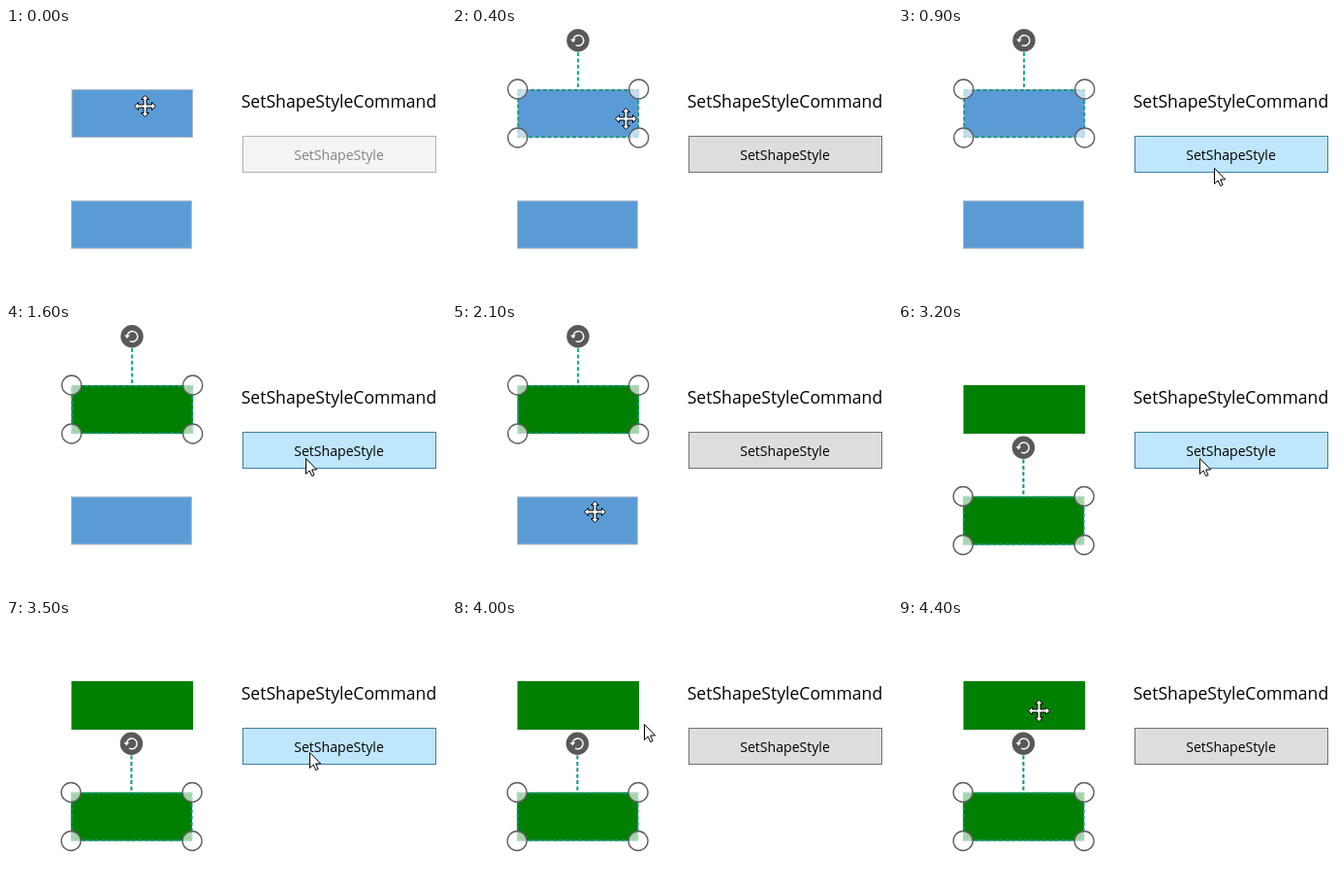
An HTML page that plays this animation: 454 px wide and 276 px high, repeating every 4.5 s.

```html
<!DOCTYPE html>
<html lang="en">
<head>
<meta charset="utf-8">
<style>
  html, body { margin: 0; width: 100%; height: 100%; overflow: hidden; background: #fff; }
  svg { display: block; width: 454px; height: 276px; }
  text { font-family: "Open Sans", "Noto Sans", sans-serif; }

  .shape { fill: #5b9bd5; stroke: #b4bcc4; }
  .shape.styled { fill: #008000; stroke: #008000; }

  #button rect { fill: #ddd; stroke: #707070; }
  #button.hover rect { fill: #bee6fd; stroke: #3c7fa5; }
  #button.disabled rect { fill: #f4f4f4; stroke: #adb2b5; }
  #button.disabled text { fill: #838383; }

  .dash { fill: none; stroke: #159580; stroke-width: 1.8; stroke-dasharray: 4 2.4; }
  #stem { stroke: #12b394; stroke-width: 2; }
  .lower #stem { stroke: #129083; }
  .grip { fill: #fff; fill-opacity: .65; stroke: #5c5c5c; stroke-width: 1.35; }
  .cursor { fill: #fff; stroke: #000; }
</style>
</head>
<body>
<svg viewBox="0 0 454 276">
  <rect id="first" class="shape" x="68" y="63.5" width="124.5" height="49"/>
  <rect id="second" class="shape" x="67.5" y="178" width="124" height="49"/>

  <text x="242.7" y="82" font-size="17.6">SetShapeStyleCommand</text>
  <g id="button">
    <rect x="244.5" y="111.5" width="199" height="37"/>
    <text x="343.5" y="136" font-size="14.1" text-anchor="middle">SetShapeStyle</text>
  </g>

  <g id="selection">
    <path id="stem" class="dash" d="M130 25V63"/>
    <rect class="dash" x="68.3" y="63.8" width="124" height="48.6"/>
    <circle class="grip" cx="67.7" cy="63" r="10"/>
    <circle class="grip" cx="192.7" cy="63" r="10"/>
    <circle class="grip" cx="67.7" cy="113" r="10"/>
    <circle class="grip" cx="192.7" cy="113" r="10"/>
    <circle cx="130" cy="12.8" r="11.7" fill="#595959"/>
    <path d="M125 12.6A5.4 5.4 0 1 1 127.6 17.5" fill="none" stroke="#fff" stroke-width="1.4"/>
    <path d="M122.2 11.4H127.8L125 15Z" fill="#fff"/>
  </g>

  <path id="arrow" class="cursor" d="M0 0V16L3.7 12.5 6.2 18.1 8.6 17.1 6.2 11.5H11.2Z"/>
  <path id="mover" class="cursor"/>
</svg>
<script>
const LOOP = 4500, STEP = 100;
const SELECT_FIRST = 200, STYLE_FIRST = 1200, SELECT_SECOND = 2300, STYLE_SECOND = 3200;

// Where the pointer turns or rests
const stops = [
  { t: 200, x: 143, y: 80 },
  { t: 900, x: 326, y: 144 },
  { t: 1600, x: 309, y: 138 },
  { t: 2100, x: 147, y: 193 },
  { t: 2400, x: 147, y: 193 },
  { t: 2800, x: 308, y: 141 },
  { t: 3500, x: 313, y: 136 },
  { t: 4300, x: 145, y: 93 }
];

const $ = id => document.getElementById(id);
const between = (v, low, high) => v >= low && v < high;
const ease = k => k * k * (3 - 2 * k);
const snap = v => Math.round(v) + .5;

// One arm of the four-way cursor, turned about the centre
const arm = [[-1.5, -1.5], [-1.5, -7], [-4, -7], [0, -11], [4, -7], [1.5, -7]];
const outline = [0, 1, 2, 3].flatMap(turn => arm.map(([x, y]) => {
  for (let i = 0; i < turn; i++) [x, y] = [-y, x];
  return [x, y];
}));
$("mover").setAttribute("d", `M${outline.join("L")}Z`);

function pointer(t) {
  const next = stops.findIndex(s => s.t > t);
  if (next < 1) return next ? stops.at(-1) : stops[0];
  const a = stops[next - 1], b = stops[next];
  const k = ease((t - a.t) / (b.t - a.t));
  return { x: a.x + (b.x - a.x) * k, y: a.y + (b.y - a.y) * k };
}

function place(id, { x, y }, shown) {
  $(id).setAttribute("transform", `translate(${snap(x)} ${snap(y)})`);
  $(id).style.visibility = shown ? "visible" : "hidden";
}

function draw(t) {
  const selected = t >= SELECT_FIRST, lower = t >= SELECT_SECOND;
  const hover = between(t, 700, 1700) || between(t, 2900, 3700);

  $("first").classList.toggle("styled", t >= STYLE_FIRST);
  $("second").classList.toggle("styled", t >= STYLE_SECOND);
  $("button").setAttribute("class", !selected ? "disabled" : hover ? "hover" : "");

  const box = $("selection");
  box.style.visibility = selected ? "visible" : "hidden";
  box.classList.toggle("lower", lower);
  box.setAttribute("transform", lower ? "translate(-.6 114.5)" : "");

  const spot = pointer(t);
  const onShape = between(spot.x, 67, 193) &&
    (between(spot.y, 63, 113) || between(spot.y, 178, 228));
  place("mover", spot, onShape);
  place("arrow", spot, !onShape);
}

const start = performance.now();
function tick() {
  const t = (performance.now() - start) % LOOP;
  draw(Math.floor(t / STEP) * STEP);
  requestAnimationFrame(tick);
}
tick();
</script>
</body>
</html>
```
